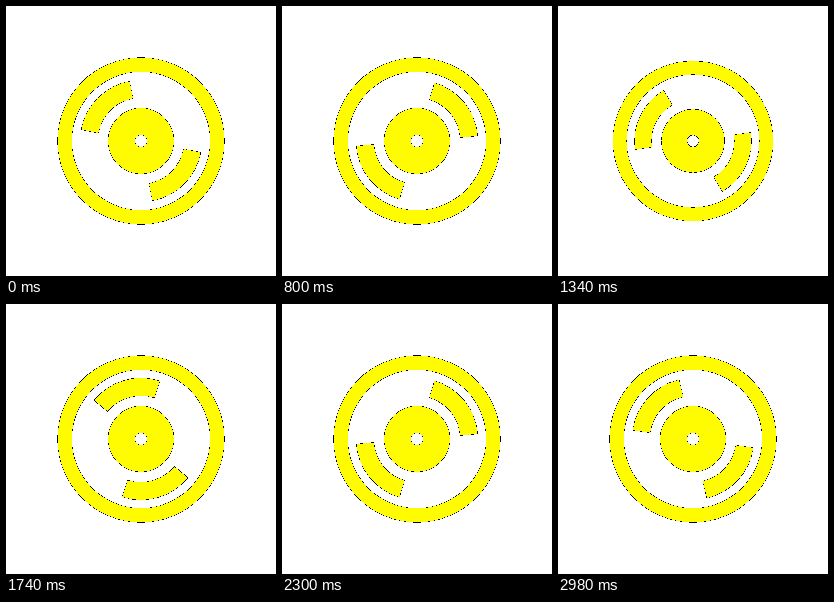
Write an HTML page with a canvas that moves like this. It is 270 px wide and 270 px high and loops after 3000 ms.

```html
<!DOCTYPE html>
<html lang="en">
<head>
<meta charset="utf-8">
<title>Spinning disc</title>
<style>
  html, body { margin: 0; width: 100%; height: 100%; overflow: hidden; background: #fff; }
  canvas { display: block; }
</style>
</head>
<body>
<canvas id="stage" width="270" height="270"></canvas>
<script>
const SIZE = 270, LOOP = 3000, STEP = 20, TAU = Math.PI * 2;
const ctx = document.getElementById('stage').getContext('2d', { willReadFrequently: true });
const rad = deg => deg * Math.PI / 180;

function ring(inner, outer) {
  ctx.beginPath();
  ctx.arc(0, 0, outer, 0, TAU);
  ctx.arc(0, 0, inner, TAU, 0, true);
  ctx.fill();
}

function band(inner, outer, middle, span) {
  const from = rad(middle - span / 2), to = rad(middle + span / 2);
  ctx.beginPath();
  ctx.arc(0, 0, outer, from, to);
  ctx.arc(0, 0, inner, to, from, true);
  ctx.fill();
}

// Hard edges: faintly covered pixels turn black, the rest solid yellow
function hardenEdges() {
  const image = ctx.getImageData(0, 0, SIZE, SIZE), px = image.data;
  for (let i = 0; i < px.length; i += 4) {
    const cover = px[i + 3];
    if (cover < 8) {
      px[i + 3] = 0;
      continue;
    }
    const solid = cover > 88;
    px[i] = solid ? 255 : 0;
    px[i + 1] = solid ? 251 : 0;
    px[i + 2] = 0;
    px[i + 3] = 255;
  }
  ctx.putImageData(image, 0, 0);
}

// The disc shrinks briefly near the middle of each turn
function discScale(t) {
  const d = (t - 1420) / 300;
  return Math.abs(d) < 1 ? 1 - 0.048 * Math.cos(d * Math.PI / 2) ** 2 : 1;
}

function draw(now) {
  const t = Math.floor(now % LOOP / STEP) * STEP;
  const angle = 45 + 360 * t / LOOP;
  const scale = discScale(t);
  ctx.setTransform(1, 0, 0, 1, 0, 0);
  ctx.clearRect(0, 0, SIZE, SIZE);
  ctx.setTransform(scale, 0, 0, scale, SIZE / 2, SIZE / 2);
  ring(69.5, 83.2);
  ring(6.5, 32.7);
  band(43.5, 60.7, angle, 68);
  band(43.5, 60.7, angle + 180, 68);
  hardenEdges();
}

const start = performance.now();
function tick() {
  draw(performance.now() - start);
  requestAnimationFrame(tick);
}
tick();
</script>
</body>
</html>
```
